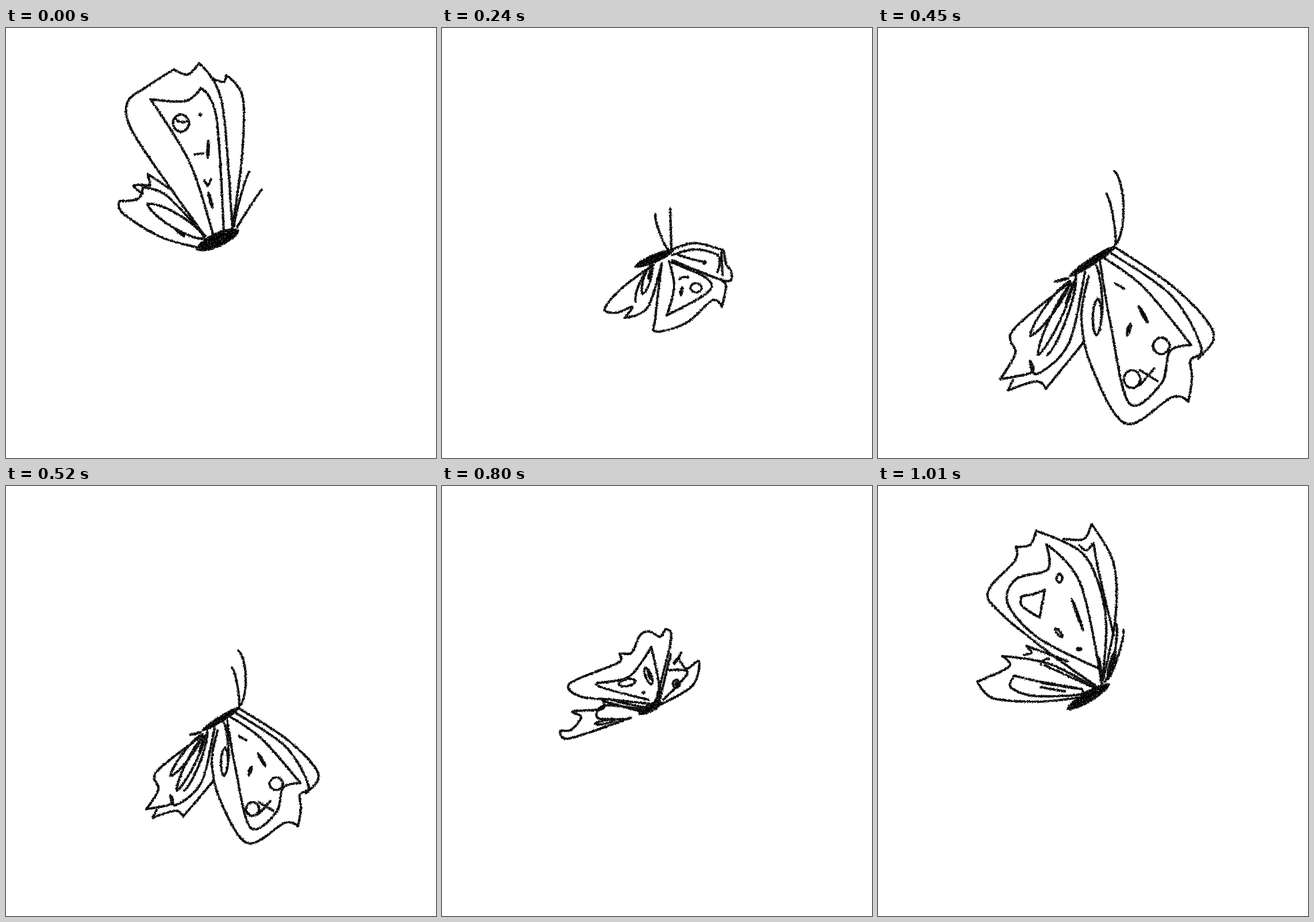
An HTML page for the animation above (1110 ms loop, 748 by 748 pixels).

```html
<!DOCTYPE html>
<html>
<head>
<meta charset="utf-8">
<title>Butterfly</title>
<style>
html, body { margin: 0; width: 100%; height: 100%; overflow: hidden; background: #fff; }
svg { display: block; width: 100%; height: 100%; }
path { fill: none; stroke: #080808; stroke-linecap: round; stroke-linejoin: round; vector-effect: non-scaling-stroke; }
#lines { stroke-width: 4.1px; }
#blots { stroke-width: 3.4px; fill: #000; }
</style>
</head>
<body>
<svg viewBox="0 0 748 748">
  <filter id="charcoal" filterUnits="userSpaceOnUse" x="0" y="0" width="748" height="748" color-interpolation-filters="sRGB">
    <feTurbulence type="fractalNoise" baseFrequency=".4" numOctaves="2" seed="4" result="noise"/>
    <feDisplacementMap in="SourceGraphic" in2="noise" scale="4" xChannelSelector="R" yChannelSelector="G" result="rough"/>
    <feColorMatrix in="noise" values="0 0 0 0 0  0 0 0 0 0  0 0 0 0 0  0 0 0 3 -.2" result="grain"/>
    <feComposite in="rough" in2="grain" operator="in"/>
  </filter>
  <g filter="url(#charcoal)"><g id="pose"><path id="lines"/><path id="blots"/></g></g>
</svg>
<script>
// Smooth curve through a few key points; "!" marks a sharp corner.
function curve(text) {
  const pts = text.split(' ').map(s => ({ p: s.split(',').map(parseFloat), sharp: s.endsWith('!') }));
  const last = pts.length - 1;
  const handle = (i, sign) => pts[i].p.map((v, k) => {
    const slope = pts[Math.min(i + 1, last)].p[k] - pts[Math.max(i - 1, 0)].p[k];
    return pts[i].sharp ? v : v + sign * slope / 6;
  });
  return pts.map(({ p }, i) => i ? `C${handle(i - 1, 1)} ${handle(i, -1)} ${p}` : `M${p}`).join('');
}

// Arc between two points, pushed sideways by bow in its middle.
function bend(x1, y1, x2, y2, bow = 0) {
  const dx = x2 - x1, dy = y2 - y1, k = bow * 4 / 3 / Math.hypot(dx, dy);
  const at = f => [x1 + f * dx - k * dy, y1 + f * dy + k * dx];
  return `M${x1},${y1}C${at(.15)} ${at(.85)} ${x2},${y2}`;
}

// Closed oval between two points, w wide to either side.
const leaf = (x1, y1, x2, y2, w) =>
  bend(x1, y1, x2, y2, w) + bend(x2, y2, x1, y1, w).replace(/^M[^C]*/, '') + 'Z';

const raised = {
  lines: [
    curve('346,362 280,270 219,178 211,130 245,102 292,72! 316,81 336,61! 364,97 380,160 394,350'),
    curve('361,362 320,235 251,124! 312,127 339,105! 366,155 379,355'),
    curve('357,87 378,94 383,82! 412,122 410,230 393,350'),
    curve('346,362 280,292 238,277! 230,297 198,301! 203,322 270,364 335,382'),
    curve('290,283 247,254! 251,274! 222,274 238,288'),
    curve('345,265 351,275! 357,263'),
    bend(423, 250, 397, 345, 3), bend(445, 281, 402, 347, 1),
    bend(296, 159, 317, 160, 4), bend(328, 220, 343, 218),
    leaf(345, 366, 246, 306, 12), leaf(304, 150, 305, 181, 14)
  ],
  blots: [
    leaf(332, 385, 404, 352, 11), leaf(295, 350, 310, 362, 1.5), leaf(337, 149, 338, 152, 1.5),
    leaf(352, 196, 351, 226, 1.5), leaf(352, 286, 359, 313, 1.5)
  ]
};
const lowering = {
  lines: [
    curve('400,385 440,374 490,387! 494,412! 503,424 493,440 400,404'),
    curve('400,395 440,385 478,394 483,410 479,425'),
    curve('382,410 371,505 372,528 425,513 470,474 487,485! 494,450 488,440'),
    curve('395,405 404,450 391,500! 462,460 460,435 400,408'),
    curve('360,417 310,455 283,489 305,495 331,485 318,504! 358,486 382,410'),
    bend(371, 324, 394, 386, 4), bend(397, 314, 399, 386),
    bend(486, 390, 488, 430), bend(410, 394, 452, 406, 1),
    bend(413, 437, 428, 434, -2), bend(368, 412, 337, 476, 8),
    leaf(432, 452, 452, 452, 8), leaf(364, 413, 349, 463, 6)
  ],
  blots: [
    leaf(336, 415, 402, 387, 6), leaf(366, 414, 359, 437, 1.5),
    leaf(418, 451, 415, 465, 1.5), leaf(455, 407, 458, 409, 2.5)
  ]
};
const lowered = {
  lines: [
    curve('407,388 490,442 543,500 522,535'),
    curve('400,395 485,452 526,520 511,537 513,560 508,592! 485,586 420,621 372,545 358,480 368,425'),
    curve('383,400 399,490 425,594 470,568 482,525 512,517! 445,440 388,400'),
    curve('340,435 262,497 265,528 244,562! 288,553 286,538! 296,555 340,515 363,420'),
    curve('262,563 255,577! 295,565 308,575! 362,512'),
    bend(404, 286, 406, 383, -12), bend(393, 316, 405, 385, -4),
    bend(405, 435, 418, 442), bend(440, 570, 460, 548), bend(440, 550, 465, 565),
    bend(378, 410, 386, 480, -4), bend(350, 425, 310, 530, -8),
    leaf(417, 562, 441, 562, 12), leaf(458, 518, 482, 518, 11), leaf(381, 455, 379, 504, 6),
    leaf(342, 432, 286, 505, 7), leaf(345, 435, 297, 530, 7)
  ],
  blots: [
    leaf(342, 425, 405, 386, 4), leaf(320, 433, 340, 428, 1), leaf(350, 428, 336, 462, 1),
    leaf(438, 465, 451, 487, 1.5), leaf(427, 488, 422, 504, 2)
  ]
};
const gliding = {
  lines: [
    curve('370,380 300,372 240,366 223,343 305,308 310,292 330,290 344,260 360,253 380,262 390,249 398,270 370,382'),
    curve('360,372 269,346 325,332 364,280! 378,350 370,375'),
    curve('403,308 411,300 425,318 447,305 435,348 375,383'),
    curve('395,320 427,325 385,372'),
    curve('345,392 280,374! 278,388 228,392 242,402 225,424 206,425! 222,439 328,403'),
    curve('345,388 282,382 272,404 325,405'),
    bend(398, 292, 378, 375), bend(416, 290, 405, 310), bend(300, 374, 350, 385),
    leaf(353, 316, 365, 345, 5), leaf(307, 345, 337, 339, 6),
    leaf(409, 337, 406, 351, 6), leaf(266, 414, 300, 407, 3)
  ],
  blots: [
    leaf(343, 396, 382, 376, 6), leaf(381, 352, 370, 382, 2), leaf(358, 321, 363, 336, 1.5),
    leaf(350, 358, 351, 361, 2), leaf(409, 341, 407, 348, 2), leaf(280, 407, 296, 406, 1)
  ]
};
const spread = {
  lines: [
    curve('385,352 295,288 210,218 192,182 238,130 240,106! 265,102 275,78! 350,112 382,165 397,240 390,345'),
    curve('385,318 280,265 226,205 240,162 295,145 293,102! 352,170 390,345'),
    curve('322,92 358,92 371,66! 410,135 413,230 392,335'),
    curve('350,103 362,112 375,99! 384,150 410,260'),
    curve('385,355 300,310 216,296! 228,314 173,340! 200,369 280,375 350,368'),
    curve('330,305 258,278! 267,290 254,294'),
    curve('354,353 280,340 237,330! 231,350 270,365 350,363 354,353'),
    curve('250,192 270,188 290,181! 281,229! 250,208 250,192'),
    bend(427, 250, 400, 335, -5), bend(414, 240, 395, 340, -7), bend(297, 301, 284, 311, 4),
    bend(380, 353, 290, 312), bend(283, 350, 325, 357), bend(354, 362, 382, 350),
    leaf(413, 287, 400, 330, 3), leaf(316, 153, 315, 168, 5),
    leaf(308, 248, 321, 263, 3), leaf(346, 283, 354, 284, 2)
  ],
  blots: [
    leaf(330, 388, 402, 345, 8), leaf(337, 196, 357, 251, 1.5),
    leaf(384, 297, 390, 345, 1.5), leaf(283, 342, 352, 353, .8)
  ]
};

// Each step: drawing, horizontal and vertical stretch, fixed point.
const rising = [gliding, 1.05, 1.5, 360, 392];
const level = [lowering, 1.1, .6, 370, 402];
const falling = [lowered, .9, .82, 375, 402];
const bottom = [lowered, 1.24, 1.31, 375, 405];
const closing = [spread, 1.05, .85, 365, 372];
const down = [[gliding], level, [lowering], falling, [lowered]];
const steps = [[raised], rising, ...down, bottom, ...down.slice().reverse(), rising, closing, [spread]];

const el = id => document.getElementById(id);
let shown = -1;

function show(i) {
  const [drawing, sx = 1, sy = 1, x = 0, y = 0] = steps[i];
  for (const kind in drawing) el(kind).setAttribute('d', drawing[kind].join(''));
  el('pose').setAttribute('transform', `translate(${x} ${y}) scale(${sx} ${sy}) translate(${-x} ${-y})`);
  shown = i;
}

function tick() {
  const t = performance.now() % 1110;
  const i = t < 30 ? 0 : Math.min(15, 1 + Math.floor((t - 30) / 70));
  if (i !== shown) show(i);
  requestAnimationFrame(tick);
}
tick();
</script>
</body>
</html>
```
